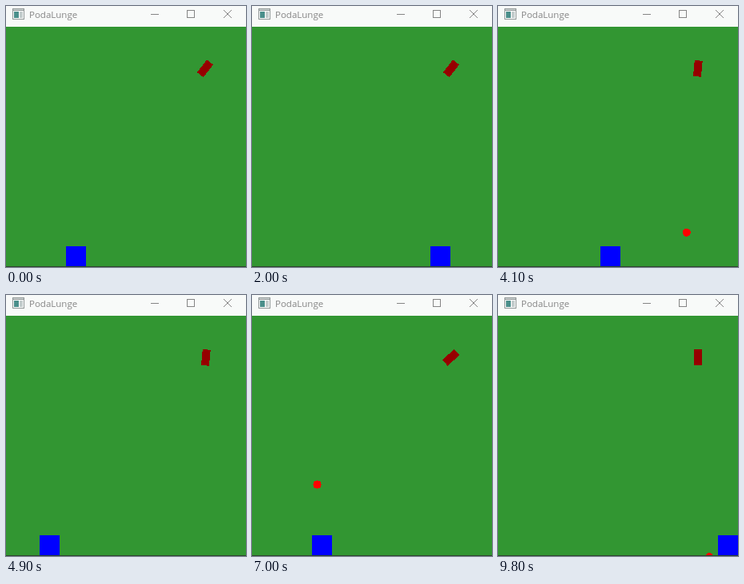
Recreate the animation shown at these times as an HTML page with a canvas. Size 300 by 327 pixels, loop 9.9 s.

```html
<!DOCTYPE html>
<html lang="en">
<head>
<meta charset="utf-8">
<title>PodaLunge</title>
<style>
  html, body { margin: 0; width: 100%; height: 100%; overflow: hidden; background: #329632; }
  canvas { display: block; }
</style>
</head>
<body>
<canvas id="stage" width="300" height="327"></canvas>
<script>
const ctx = document.getElementById('stage').getContext('2d');
const LOOP = 9900, STEP = 100;
const BAR = 26, FLOOR = 326, SIZE = 25;
const GREY = '#858585';

// Player path: time in ms, left edge
const path = [
  [0, 75], [655, 75], [2000, 223], [2475, 275], [2775, 275], [3300, 217],
  [3700, 172], [4700, 63], [4900, 42], [5285, 0], [6318, 0], [7000, 75],
  [7900, 173], [8400, 228], [8830, 275], [LOOP, 275]
];

// Each shot passes (x, y) at time at; velocity is per step
const shots = [
  { from: 500, to: 1900, at: 500, x: 247, y: 91, vx: -13.4, vy: 17.3 },
  { from: 3200, to: 4400, at: 3300, x: 252.5, y: 104.5, vx: -2.1, vy: 22.4 },
  { from: 6000, to: 7500, at: 7000, x: 81.5, y: 237.5, vx: -16.1, vy: 14.3 },
  { from: 8700, to: LOOP, at: 8900, x: 257, y: 131, vx: 0.8, vy: 21.9 }
];

function rect(color, x, y, w, h) {
  ctx.fillStyle = color;
  ctx.fillRect(x, y, w, h);
}

// Hard-edged fill of every pixel near (cx, cy) that passes the test
function fillPixels(color, cx, cy, reach, inside) {
  for (let y = Math.floor(cy - reach); y <= cy + reach; y++) {
    for (let x = Math.floor(cx - reach); x <= cx + reach; x++) {
      if (y < FLOOR && inside(x + 0.5 - cx, y + 0.5 - cy)) rect(color, x, y, 1, 1);
    }
  }
}

function playerX(t) {
  const i = path.findIndex(p => p[0] > t);
  const [t0, x0] = path[i - 1], [t1, x1] = path[i];
  return Math.round(x0 + (x1 - x0) * (t - t0) / (t1 - t0));
}

function drawTurret({ vx, vy }) {
  const v = Math.hypot(vx, vy), ux = vx / v, uy = vy / v;
  const cx = 250 + ux * 1.8;
  fillPixels('#960000', cx, 78.3, 13, (x, y) =>
    Math.abs(x * ux + y * uy) <= 10 && Math.abs(x * uy - y * ux) <= 5);
}

function drawBullet(s, t) {
  const n = (t - s.at) / STEP;
  fillPixels('#ff0000', s.x + s.vx * n, s.y + s.vy * n, 6, (x, y) => x * x + y * y <= 25);
}

function drawBar() {
  rect('#f8faf9', 0, 0, 300, BAR);

  rect('#8f9696', 8, 3, 15, 14);
  rect('#ffffff', 9, 6, 13, 10);
  rect('#d3d9d9', 9, 4, 13, 1);
  rect('#4b8f8b', 10, 7, 6, 8);
  rect('#c3cccc', 17, 7, 4, 8);

  ctx.fillStyle = GREY;
  ctx.font = '11.5px "Open Sans", "Noto Sans", sans-serif';
  ctx.fillText('PodaLunge', 29, 15);

  rect(GREY, 181, 10, 10, 1);
  ctx.strokeStyle = GREY;
  ctx.lineWidth = 1;
  ctx.strokeRect(226.5, 5.5, 9, 9);
  ctx.beginPath();
  ctx.moveTo(272, 5);
  ctx.lineTo(282, 15);
  ctx.moveTo(282, 5);
  ctx.lineTo(272, 15);
  ctx.stroke();
}

function draw(t) {
  rect('#329632', 0, BAR, 300, FLOOR - BAR);
  rect('#2c462c', 0, FLOOR, 300, 1);
  drawBar();

  const fired = shots.filter(s => t >= s.from);
  const last = fired[fired.length - 1];
  drawTurret(last || shots[0]);
  rect('#0000ff', playerX(t), FLOOR - SIZE, SIZE, SIZE);
  if (last && t < last.to) drawBullet(last, t);
}

const start = performance.now();
function tick() {
  const t = (performance.now() - start) % LOOP;
  draw(Math.floor(t / STEP) * STEP);
  requestAnimationFrame(tick);
}
tick();
</script>
</body>
</html>
```
